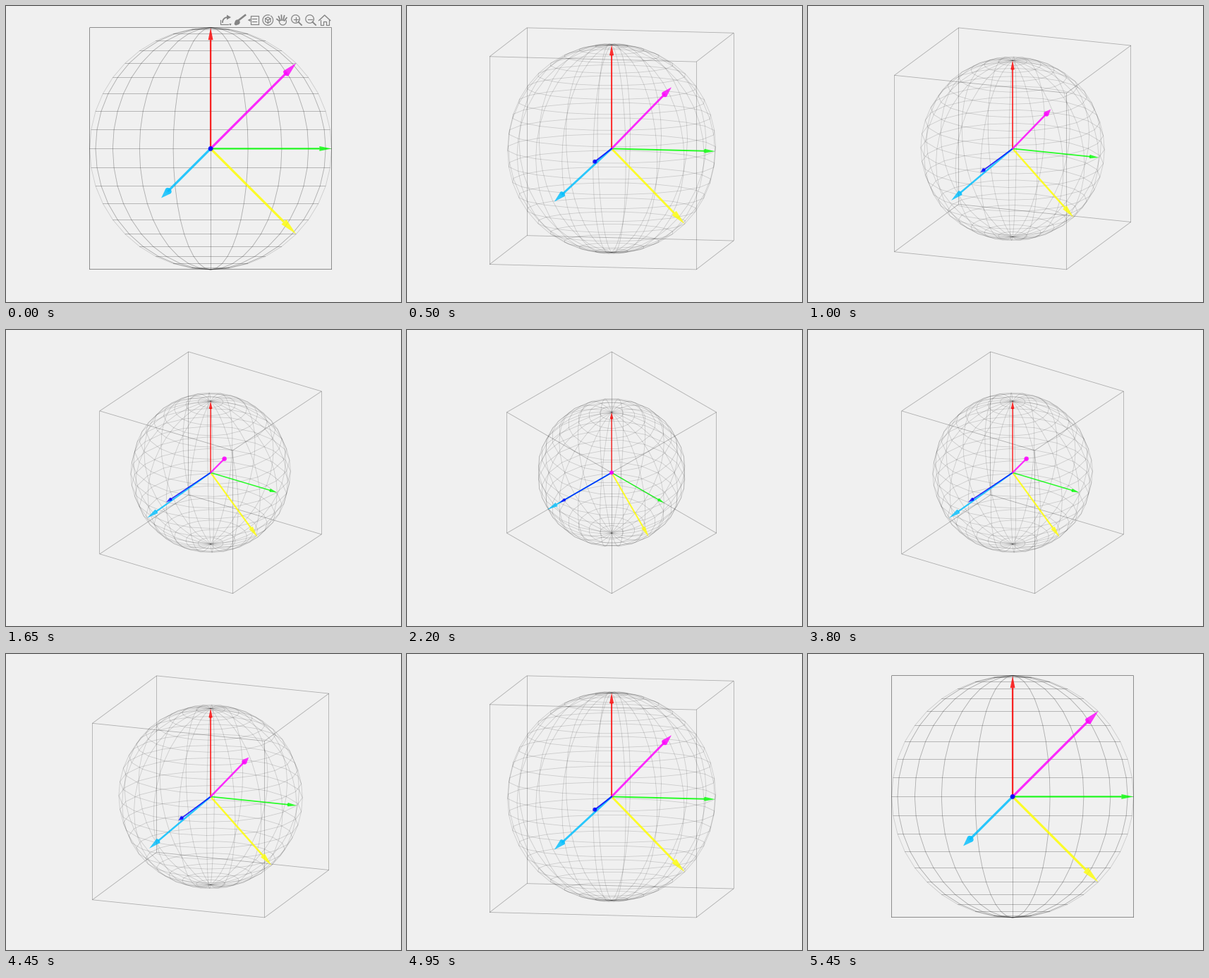
Recreate the animation shown at these times as a matplotlib script. Size 560x420 px, loop 6500 ms.

```python
import numpy as np
import matplotlib.pyplot as plt
from matplotlib.animation import FuncAnimation
from matplotlib.collections import LineCollection
from matplotlib.patches import Polygon

W, H, DPI = 560, 420, 100
PX = 72 / DPI                      # one pixel in points
CENTER = np.array([290.1, 202.4])
SPAN = 343                         # projected height of the cube, always fitted
STEPS = 44
TURN = 66                          # frame at which the camera goes back
FRAMES = 130
AZ_END = np.pi / 4
EL_END = np.arctan(1 / np.sqrt(2))
BG, ICON = "#f0f0f0", "#848484"

fig = plt.figure(figsize=(W / DPI, H / DPI), dpi=DPI, facecolor=BG)
ax = fig.add_axes([0, 0, 1, 1])
ax.set_xlim(0, W)
ax.set_ylim(H, 0)
ax.axis("off")


# ---------- camera ----------
def camera(step):
    """Rows: screen right, screen down, depth; plus pixels per unit."""
    az, el = AZ_END * step / STEPS, EL_END * step / STEPS
    ca, sa, ce, se = np.cos(az), np.sin(az), np.cos(el), np.sin(el)
    view = np.array([[-sa, ca, 0],
                     [se * ca, se * sa, -ce],
                     [ce * ca, ce * sa, se]])
    return view, SPAN / 2 / (ce + se * (ca + sa))


def project(points, view, scale):
    return CENTER + scale * (points @ view[:2].T)


def hull(points):
    """Convex outline by monotone chain."""
    pts = sorted(map(tuple, np.round(points, 4)))

    def chain(seq):
        out = []
        for p in seq:
            while len(out) > 1 and (
                    (out[-1][0] - out[-2][0]) * (p[1] - out[-2][1])
                    <= (out[-1][1] - out[-2][1]) * (p[0] - out[-2][0])):
                out.pop()
            out.append(p)
        return out[:-1]

    return np.array(chain(pts) + chain(pts[::-1]))


# ---------- wireframes ----------
def sphere_edges(n=20):
    lat = np.linspace(-np.pi / 2, np.pi / 2, n + 1)[:, None]
    lon = np.linspace(0, 2 * np.pi, n + 1)[None, :]
    grid = np.stack([np.cos(lat) * np.cos(lon), np.cos(lat) * np.sin(lon),
                     np.sin(lat) + 0 * lon], axis=-1)
    meridians = np.stack([grid[:-1, :-1], grid[1:, :-1]], axis=2)
    parallels = np.stack([grid[1:-1, :-1], grid[1:-1, 1:]], axis=2)
    return np.concatenate([meridians.reshape(-1, 2, 3), parallels.reshape(-1, 2, 3)])


def cube_edges():
    return np.array([[np.insert([p, q], axis, s) for s in (-1, 1)]
                     for axis in range(3) for p in (-1, 1) for q in (-1, 1)], float)


class Wire:
    def __init__(self, edges, alpha):
        self.edges = edges
        self.lines = LineCollection([], colors="k", alpha=alpha, linewidths=0.85 * PX,
                                    zorder=1, snap=False)
        ax.add_collection(self.lines, autolim=False)

    def update(self, view, scale):
        flat = project(self.edges, view, scale)
        # upright and level edges sit on whole pixels
        level = np.abs(flat[:, :1] - flat[:, 1:]) < 1e-6
        self.lines.set_segments(np.where(level, np.floor(flat) + 0.5, flat))


# ---------- arrows ----------
class Arrow:
    def __init__(self, tip, color, stem):
        self.tip = np.array(tip, float)
        axis = self.tip / np.linalg.norm(self.tip)
        radius = 3 * stem
        base = self.tip - axis * radius / np.tan(np.pi / 16)
        side = np.cross(axis, [0.3, 0.5, -0.8])
        side /= np.linalg.norm(side)
        t = np.linspace(0, 2 * np.pi, 25)[:-1, None]
        ring = np.cos(t) * side + np.sin(t) * np.cross(axis, side)
        disc = base + radius * ring
        self.solids = [np.vstack([stem * ring, base + stem * ring]),
                       np.vstack([disc, self.tip]), disc]
        self.parts = [ax.add_patch(Polygon([[0, 0]] * 3, fc=color, ec="none",
                                           alpha=alpha, snap=False))
                      for alpha in (0.83, 0.8, 0.3)]

    def update(self, view, scale):
        depth = 10 + 4 * (self.tip @ view[2])
        for solid, part in zip(self.solids, self.parts):
            part.set_xy(hull(project(solid, view, scale)))
            part.set_zorder(depth)


# ---------- toolbar, visible only at the start ----------
def toolbar(y=20, gap=20.1):
    items = []

    def line(xs, ys, w=1.2):
        items.extend(ax.plot(xs, ys, color=ICON, lw=w * PX, zorder=30))

    def arc(x, y, r, start=0.0, stop=2.0, sides=32, w=1.2, fill=False):
        """Arc or regular polygon; angles in half turns."""
        a = np.pi * np.linspace(start, stop, sides + 1)
        xs, ys = x + r * np.cos(a), y + r * np.sin(a)
        if fill:
            items.extend(ax.fill(xs, ys, fc=ICON, ec="none", zorder=30))
        else:
            line(xs, ys, w)

    share, brush, tip, orbit, hand, zoom_in, zoom_out, home = 311 + gap * np.arange(8)

    line([share - 7, share - 7, share + 4], [y, y + 6, y + 6])
    arc(share + 3, y + 3, 7, 1, 1.5, w=1.8)
    arc(share + 4, y - 4, 4, sides=3, fill=True)
    arc(share + 7, y + 6, 2, 0.5, 2.5, sides=3, fill=True)

    line([brush - 1, brush + 8], [y, y - 7], 2.6)
    arc(brush - 3, y + 3, 3.6, fill=True)
    arc(brush - 5, y + 5, 2.4, fill=True)

    arc(tip + 1, y, 8, 0.25, 2.25, sides=4)
    arc(tip - 6, y, 2.5, 1, 3, sides=3, fill=True)
    for dy in (-2, 2):
        line([tip - 2, tip + 4], [y + dy, y + dy])

    arc(orbit, y, 7.3, -0.3, 1.6)
    arc(orbit, y, 4.2, 0.5, 2.5, sides=6)
    for k in range(3):
        a = np.pi * (1 / 2 + 2 * k / 3)
        line([orbit, orbit + 4.2 * np.cos(a)], [y, y + 4.2 * np.sin(a)])

    arc(hand + 1, y + 2, 5, -0.1, 1.1)
    for k in range(5):
        a = np.pi * (1.12 + 0.17 * k)
        line(hand + np.cos(a) * np.array([4, 8]), y + 2 + np.sin(a) * np.array([2, 9]), 1.7)

    for x in (zoom_in, zoom_out):
        arc(x - 1, y - 1.5, 5.8)
        line([x + 3, x + 7.5], [y + 2.7, y + 7], 1.8)
        line([x - 4, x + 2], [y - 1.5, y - 1.5])
    line([zoom_in - 1, zoom_in - 1], [y - 4.5, y + 1.5])

    line([home - 8, home, home + 8], [y + 0.5, y - 7, y + 0.5], 1.4)
    for side in (-1, 1):
        line(home + side * np.array([6, 6, 2, 2, 0]), y + np.array([0, 7, 7, 2, 2]))
    return items


THIN, THICK = 1 / 150, 1 / 105
R2, R6 = 1 / np.sqrt(2), 1 / np.sqrt(6)
scene = [
    Wire(sphere_edges(), 0.15),
    Wire(cube_edges(), 0.27),
    Arrow([1, 0, 0], "#0000ff", THIN),
    Arrow([0, 1, 0], "#00ff00", THIN),
    Arrow([0, 0, 1], "#ff0000", THIN),
    Arrow([2 * R6, -R6, -R6], "#00bfff", THICK),
    Arrow([0, R2, -R2], "#ffff00", THICK),
    Arrow([R2, R2, R2], "#ff00ff", THICK),
]
icons = toolbar()


def draw(n):
    step = min(n, STEPS) if n < TURN else max(0, STEPS - 1 - (n - TURN))
    view, scale = camera(step)
    for item in scene:
        item.update(view, scale)
    for icon in icons:
        icon.set_visible(n == 0)
    return []


anim = FuncAnimation(fig, draw, frames=FRAMES, interval=50, repeat=True,
                     repeat_delay=0, blit=False)
plt.show()
```
